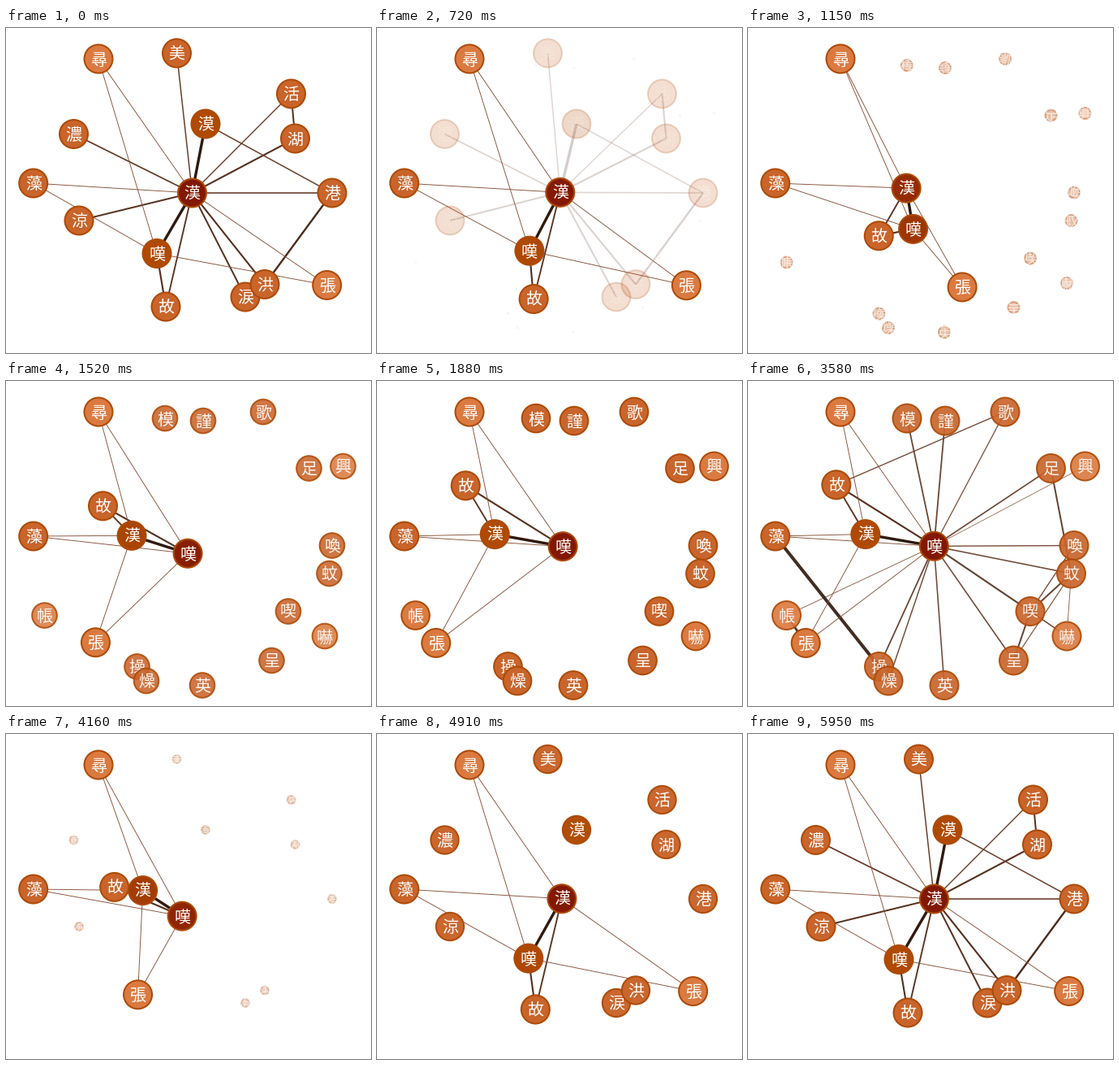
These frames come from a looping animation (450x400 px, 6.02 s). A matplotlib script:

```python
import matplotlib.pyplot as plt
import numpy as np
from matplotlib.animation import FuncAnimation
from matplotlib.collections import LineCollection
from matplotlib.colors import to_rgb
from matplotlib.patches import Circle

W, H, DPI = 450, 400, 100
PT = 72 / DPI                      # points per pixel
STEP, FRAMES = 20, 301             # 6020 ms per loop
TICK = 60                          # pose update period in ms
RADIUS, FONT = 17.5, 20

MOVE = 2080
FADE_OUT = 950
EDGE_DELAY, EDGE_IN = 1650, 1000

DARK, STRONG, MID, LIGHT = "#821800", "#b04a02", "#c9642a", "#db7a40"
RING = "#ad4a06"

# Kanji present in both views: (position, fill) in the first and second one
SHARED = {
    "尋": ((114, 38), LIGHT, (114, 38), LIGHT),
    "藻": ((33.7, 191), MID, (33.7, 191), MID),
    "故": ((197, 343), MID, (108.5, 127), MID),
    "張": ((395.7, 316.5), LIGHT, (70, 322.5), LIGHT),
    "漢": ((229.5, 203), DARK, (144.5, 188.5), STRONG),
    "嘆": ((186, 277.5), STRONG, (229.5, 203), DARK),
}
FIRST = {
    "美": (210.5, 31, MID), "漠": (246, 118, STRONG), "活": (351.5, 81, MID),
    "湖": (356.5, 136, MID), "港": (402, 203, MID), "涙": (295, 331, MID),
    "洪": (319, 315.5, MID), "涼": (90, 237, MID), "濃": (83.5, 130.5, MID),
}
SECOND = {
    "模": (196, 46, MID), "謹": (243, 49, MID), "歌": (317, 38, MID),
    "足": (373.5, 107.5, MID), "興": (415.5, 105, LIGHT),
    "喚": (402, 202.5, MID), "蚊": (398.5, 237, MID), "喫": (348, 283.5, MID),
    "嚇": (393, 314, LIGHT), "呈": (327.5, 344, MID), "英": (242, 374.5, MID),
    "操": (161.5, 351.5, MID), "燥": (173, 369, MID), "帳": (47.5, 288.5, LIGHT),
}

# Two kanji and the line weight
SHARED_EDGES = ("漢嘆3.4 漢故1.9 嘆故2.1 漢尋.9 嘆尋.9 漢藻.9 嘆藻.9 "
                "漢張.9 嘆張.9")
FIRST_EDGES = ("漢美1.5 漢漠3.4 漢活1.4 漢湖2.1 漢港1.6 漢洪2.1 漢涙2 漢涼2 "
               "漢濃1.7 活湖2 漠港1.5 港洪2.4")
SECOND_EDGES = ("嘆模1.8 嘆謹1.8 嘆歌1.3 嘆足1.7 嘆興.8 嘆喚1.4 嘆蚊1.6 嘆喫2.1 "
                "嘆呈1.6 嘆英1.6 嘆操1.8 嘆燥1.5 嘆帳.9 故歌1.4 足蚊2 喚喫1.4 "
                "喫蚊2 蚊呈1.2 蚊嚇.9 喫嚇1.6 喫呈2 藻操4 帳張2.8")


def ease(p):
    """Quartic ease in and out."""
    p = min(max(p, 0), 1)
    return 8 * p ** 4 if p < 0.5 else 1 - 8 * (1 - p) ** 4


def mix(a, b, k):
    return np.array(a) * (1 - k) + np.array(b) * k


def parse(text):
    return [(e[0], e[1], float(e[2:])) for e in text.split()]


def edge_color(weight):
    k = min(max((weight - 0.8) / 2.6, 0), 1) ** 0.7
    return mix((0.56, 0.33, 0.23), (0.19, 0.10, 0.05), k)


fig = plt.figure(figsize=(W / DPI, H / DPI), dpi=DPI, facecolor="white")
ax = fig.add_axes([0, 0, 1, 1])
ax.set(xlim=(0, W), ylim=(H, 0))
ax.axis("off")

edges = [(group, *e)
         for group, text in enumerate((FIRST_EDGES, SECOND_EDGES, SHARED_EDGES))
         for e in parse(text)]
weights = [e[3] for e in edges]
edge_rgb = [tuple(edge_color(w)) for w in weights]
lines = LineCollection([], linewidths=[w * PT for w in weights], zorder=1)
ax.add_collection(lines)


class Node:
    def __init__(self, char, pos, fill, z):
        self.dot = Circle(pos, RADIUS, fc=fill, ec=RING, lw=2 * PT, zorder=z)
        ax.add_patch(self.dot)
        self.label = ax.text(*pos, char, color="white", fontsize=FONT * PT,
                             family="Noto Sans CJK JP", weight="light",
                             ha="center", va="baseline", zorder=z + 0.5)
        self.place(pos)

    def place(self, pos):
        self.pos = tuple(pos)
        self.dot.center = self.pos
        self.label.set_position((pos[0], pos[1] + 0.375 * FONT))

    def show(self, alpha, size=1):
        for part in (self.dot, self.label):
            part.set_visible(alpha > 0.004)
        self.dot.set_alpha(alpha)
        self.label.set_alpha(alpha ** 0.5 if size < 1 else alpha)
        self.dot.set_radius(RADIUS * size)


nodes = {}
for group in (FIRST, SECOND):
    for char, (x, y, fill) in group.items():
        nodes[char] = Node(char, (x, y), fill, 2 + len(nodes))
for char, (pos, fill, _, _) in SHARED.items():
    nodes[char] = Node(char, pos, fill, 2 + len(nodes))


def clock(t):
    """Return (second view is the goal, ms since its transition began)."""
    forward = t < 3320
    hold, start = (540, 154) if forward else (3320, 3257)
    if t < hold:
        return forward, 0
    return forward, hold + (t - hold) // TICK * TICK - start


def update(i):
    forward, s = clock(i * STEP)
    moved = ease(s / MOVE)
    gone = 1 - ease(s / FADE_OUT)
    linked = ease((s - EDGE_DELAY) / EDGE_IN)
    old, new = (FIRST, SECOND) if forward else (SECOND, FIRST)

    for char in old:
        nodes[char].show(gone)
    for char in new:
        nodes[char].show(moved, moved)

    k = moved if forward else 1 - moved
    for char, (p, c, q, d) in SHARED.items():
        nodes[char].place(mix(p, q, k))
        nodes[char].dot.set_facecolor(mix(to_rgb(c), to_rgb(d), k))

    alpha = (gone, linked, 1) if forward else (linked, gone, 1)
    lines.set_segments([(nodes[a].pos, nodes[b].pos) for _, a, b, _ in edges])
    lines.set_color([(*rgb, alpha[e[0]]) for rgb, e in zip(edge_rgb, edges)])
    return []


anim = FuncAnimation(fig, update, frames=FRAMES, interval=STEP,
                     init_func=lambda: update(0), repeat=True, repeat_delay=0,
                     blit=False)
plt.show()
```
